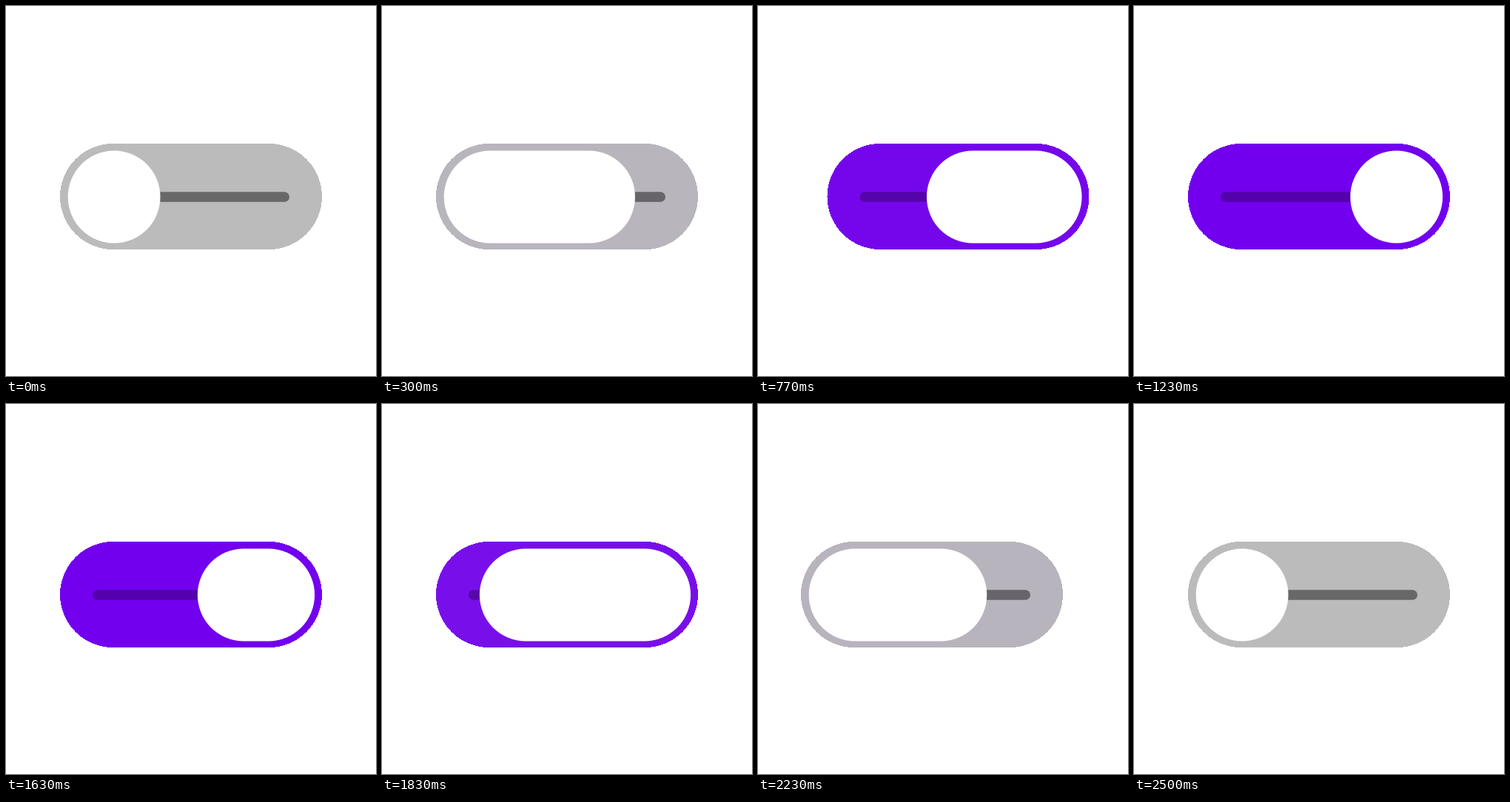
Write an HTML page that moves like this. It is 500 by 500 pixels and loops after 3.03 s.

```html
<!DOCTYPE html>
<html lang="en">
<head>
<meta charset="utf-8">
<title>Toggle switch</title>
<style>
  html, body { margin: 0; width: 100%; height: 100%; overflow: hidden; background: #fff; }
  svg { display: block; width: 100vw; height: 100vh; }
</style>
</head>
<body>
<svg viewBox="0 0 500 500">
  <g id="toggle">
    <rect id="pill" x="73" y="186" width="354" height="143" rx="71.5" shape-rendering="crispEdges"/>
    <rect id="groove" x="117" y="251.3" width="266" height="13.4" rx="6.7"/>
    <rect id="knob" y="195.5" height="125" rx="62.4" fill="#fff"/>
  </g>
</svg>
<script>
  const LOOP = 3030, FPS = 30, LAST = 75;
  const LEFT = 83.7, TRAVEL = 208.6, SIZE = 124.8, PUSH = 30;
  const OFF = { pill: [187, 187, 187], groove: [104, 104, 104] };
  const ON = { pill: [114, 0, 238], groove: [84, 0, 172] };

  const [toggle, pill, groove, knob] =
    ['toggle', 'pill', 'groove', 'knob'].map(id => document.getElementById(id));

  // Smooth 0..1 ramp between two steps
  const ramp = (n, from, to) => {
    const x = Math.min(1, Math.max(0, (n - from) / (to - from)));
    return x * x * (3 - 2 * x);
  };
  const mix = (a, b, k) => `rgb(${a.map((v, i) => Math.round(v + (b[i] - v) * k))})`;

  function draw(n) {
    // The leading edge stretches first, the trailing edge follows
    const right = ramp(n, 0.5, 14.8) - ramp(n, 60.7, 74.3);
    const left = ramp(n, 15.8, 28.6) - ramp(n, 45.5, 59.3);
    const shift = ramp(n, 13, 20) - ramp(n, 20, 28) - ramp(n, 56, 63) + ramp(n, 63, 71);
    const on = ramp(n, 7, 25) - ramp(n, 52, 69);

    toggle.setAttribute('transform', `translate(${PUSH * shift} 0)`);
    knob.setAttribute('x', LEFT + TRAVEL * left);
    knob.setAttribute('width', SIZE + TRAVEL * (right - left));
    pill.setAttribute('fill', mix(OFF.pill, ON.pill, on));
    groove.setAttribute('fill', mix(OFF.groove, ON.groove, on));
  }

  const start = performance.now();
  function tick() {
    const t = (performance.now() - start) % LOOP;
    draw(Math.min(LAST, Math.floor((t + 5) * FPS / 1000)));
    requestAnimationFrame(tick);
  }
  tick();
</script>
</body>
</html>
```
